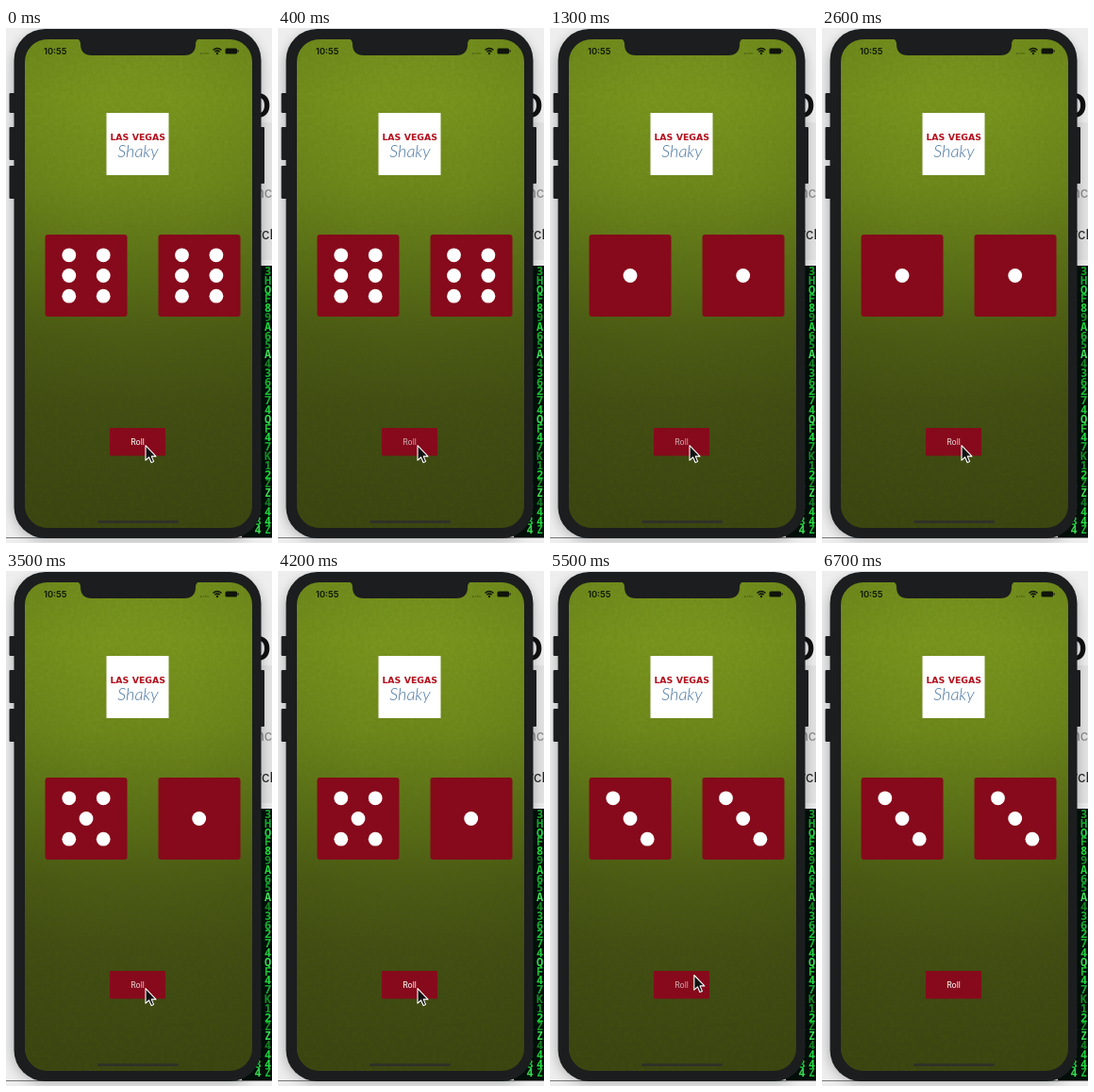
Animation of 282 by 546 pixels, one loop 7 s. Source, as an HTML page:

```html
<!DOCTYPE html>
<html lang="en">
<head>
<meta charset="utf-8">
<title>Dice roll</title>
<style>
html, body { margin: 0; width: 100%; height: 100%; overflow: hidden; background: #e2e2e2; }
svg { display: block; width: 282px; height: 546px; font-family: Inter, Roboto, sans-serif; }
</style>
</head>
<body>
<svg viewBox="0 0 282 546" xmlns="http://www.w3.org/2000/svg">
  <defs>
    <linearGradient id="felt" x2="0" y2="1">
      <stop offset="0" stop-color="#75911f"/>
      <stop offset=".12" stop-color="#7a961f"/>
      <stop offset=".3" stop-color="#6f891d"/>
      <stop offset=".45" stop-color="#5d7319"/>
      <stop offset=".6" stop-color="#4d5d16"/>
      <stop offset=".75" stop-color="#434f15"/>
      <stop offset="1" stop-color="#3c4613"/>
    </linearGradient>
    <radialGradient id="edge" cx=".5" cy=".3" r=".75">
      <stop offset=".3" stop-color="#2c3808" stop-opacity="0"/>
      <stop offset="1" stop-color="#2c3808" stop-opacity=".15"/>
    </radialGradient>
    <filter id="grain" x="0" y="0" width="1" height="1">
      <feTurbulence type="fractalNoise" baseFrequency=".25" numOctaves="2" seed="4"/>
      <feColorMatrix values="0 0 0 0 .1  0 0 0 0 .14  0 0 0 0 0  .5 0 0 0 -.16"/>
    </filter>
    <filter id="blur" x="-.2" y="-.1" width="1.4" height="1.2"><feGaussianBlur stdDeviation="7"/></filter>
    <clipPath id="screen"><rect x="20" y="12" width="241" height="518" rx="24"/></clipPath>
  </defs>

  <!-- page behind the phone -->
  <rect width="282" height="546" fill="#eee"/>
  <rect x="262" y="100" width="20" height="146" fill="#e3e3e3"/>
  <text x="255" y="95" font-size="36" font-weight="700" fill="#111">D</text>
  <text x="265" y="180" font-size="15" fill="#888">nc</text>
  <text x="265.5" y="224" font-size="15" fill="#222">rcl</text>
  <rect x="250" y="252" width="32" height="288" fill="#03100a"/>
  <g id="code" font-family="'Noto Sans Mono', monospace" font-size="12" font-weight="700"></g>
  <rect y="540" width="282" height="1" fill="#777"/>
  <rect x="8" y="6" width="262" height="536" rx="34" fill="#000" opacity=".3" filter="url(#blur)"/>

  <!-- phone -->
  <g fill="#1b1d1e">
    <rect x="3.5" y="69" width="7" height="21" rx="1"/>
    <rect x="3.5" y="105" width="7" height="35" rx="1"/>
    <rect x="3.5" y="146" width="7" height="35" rx="1"/>
    <rect x="267" y="105" width="7" height="60" rx="1"/>
    <rect x="8.5" y="1" width="262" height="540" rx="33"/>
  </g>
  <g clip-path="url(#screen)">
    <rect x="20" y="12" width="241" height="518" fill="url(#felt)"/>
    <rect x="20" y="12" width="241" height="518" fill="url(#edge)"/>
    <rect x="20" y="12" width="241" height="518" filter="url(#grain)" opacity=".55"/>
  </g>
  <path d="M74 11 Q79 12 79 17 Q79 29 91 29 H189 Q201 29 201 17 Q201 12 206 11Z" fill="#1b1d1e"/>

  <!-- status bar -->
  <g fill="#10140a">
    <text x="40" y="28" font-size="9.3" font-weight="600">10:55</text>
    <g opacity=".45">
      <circle cx="206.5" cy="27" r=".8"/><circle cx="209" cy="27" r=".8"/>
      <circle cx="211.5" cy="27" r=".8"/><circle cx="214" cy="27" r=".8"/>
    </g>
    <path d="M219.5 23.5 Q224 19.5 228.5 23.5 M221.3 25.3 Q224 23 226.7 25.3" fill="none" stroke="#10140a" stroke-width="1.5"/>
    <circle cx="224" cy="27" r="1.2"/>
    <rect x="232.5" y="21.5" width="12.5" height="6" rx="1.6"/>
    <rect x="245.5" y="23.3" width="1.2" height="2.4" rx=".6"/>
  </g>

  <!-- sign -->
  <rect x="106.5" y="90" width="66" height="66" fill="#fff"/>
  <g text-anchor="middle">
    <text x="139.7" y="119" font-family="'DejaVu Sans', sans-serif" font-size="9.4" font-weight="700" fill="#b3101c">LAS VEGAS</text>
    <text x="140" y="137" font-family="Lato, sans-serif" font-size="18" font-weight="300" font-style="italic" fill="#4b78a6">Shaky</text>
  </g>

  <g fill="#860a1b">
    <rect x="41.5" y="219" width="87" height="87" rx="3"/>
    <rect x="161.5" y="219" width="87" height="87" rx="3"/>
    <rect x="110" y="424" width="59" height="29.5" rx="1"/>
  </g>
  <g id="left" fill="#fff" transform="translate(85 262.5)"></g>
  <g id="right" fill="#fff" transform="translate(204.7 262.5)"></g>
  <text id="roll" x="139.5" y="442" font-size="8.6" text-anchor="middle" fill="#fff">Roll</text>
  <rect x="97" y="522.3" width="86" height="2.8" rx="1.4" fill="#2f3129"/>
  <path id="cursor" d="M0 0V15.6L3.6 12.3L6.1 18L8.6 16.9L6.2 11.4H11Z" fill="#111" stroke="#fff" stroke-width="1.1" stroke-linejoin="round"/>
</svg>
<script>
const $ = id => document.getElementById(id);
const LOOP = 7000, STEP = 100;

// [time, left die, right die]
const rolls = [[0, 6, 6], [1200, 1, 1], [3400, 5, 1], [4500, 3, 3]];
const presses = [100, 1000, 2200, 3100, 4200, 5200];
// [time, x, y]
const path = [[5200, 148, 442.7], [5500, 152.8, 428.5], [5700, 237, 161], [5900, 199, 276]];
const HIDE = 6000;

const diagonal = [[-1, -1], [1, 1]], other = [[1, -1], [-1, 1]], middle = [[0, 0]];
const faces = {
  1: middle,
  3: [...diagonal, ...middle],
  5: [...diagonal, ...other, ...middle],
  6: [...diagonal, ...other, [-1, 0], [1, 0]]
};
const pips = n => faces[n].map(([x, y]) =>
  `<circle cx="${x * 18.2}" cy="${y * 21.7}" r="7.4"/>`).join("");

function fillCode() {
  let seed = 7, out = "";
  const rnd = () => (seed = seed * 16807 % 2147483647) / 2147483647;
  const glyphs = "0123456789AQFHKXZ$";
  for (let y = 262; y < 541; y += 9.8)
    for (const x of [263.5, 274])
      out += `<text x="${x}" y="${y}" fill="hsl(130 75% ${30 + rnd() * 30}%)">` +
        glyphs[Math.floor(rnd() * glyphs.length)] + "</text>";
  $("code").innerHTML = out;
}

// The label dims at once when pressed, then fades back.
function labelAlpha(t) {
  const dt = t - presses.filter(p => p <= t).pop();
  if (!(dt < 500)) return 1;
  return dt < 100 ? 1 - dt / 100 * 0.7 : 0.3 + 0.7 * (dt - 100) / 400;
}

function cursorAt(t) {
  const i = path.findIndex(k => k[0] > t);
  if (i === 0) return path[0].slice(1);
  if (i < 0) return path[path.length - 1].slice(1);
  const [a, ax, ay] = path[i - 1], [b, bx, by] = path[i];
  const u = (t - a) / (b - a), e = u * u * (3 - 2 * u);
  return [ax + (bx - ax) * e, ay + (by - ay) * e];
}

let shown;
function draw(t) {
  const roll = rolls.filter(r => r[0] <= t).pop();
  if (roll !== shown) {
    shown = roll;
    $("left").innerHTML = pips(roll[1]);
    $("right").innerHTML = pips(roll[2]);
  }
  $("roll").setAttribute("opacity", labelAlpha(t));
  $("cursor").setAttribute("transform", `translate(${cursorAt(t)})`);
  $("cursor").setAttribute("visibility", t < HIDE ? "visible" : "hidden");
}

fillCode();
draw(0);
let start;
function tick(now) {
  start ??= now;
  draw(Math.floor((now - start) % LOOP / STEP) * STEP);
  requestAnimationFrame(tick);
}
requestAnimationFrame(tick);
</script>
</body>
</html>
```
